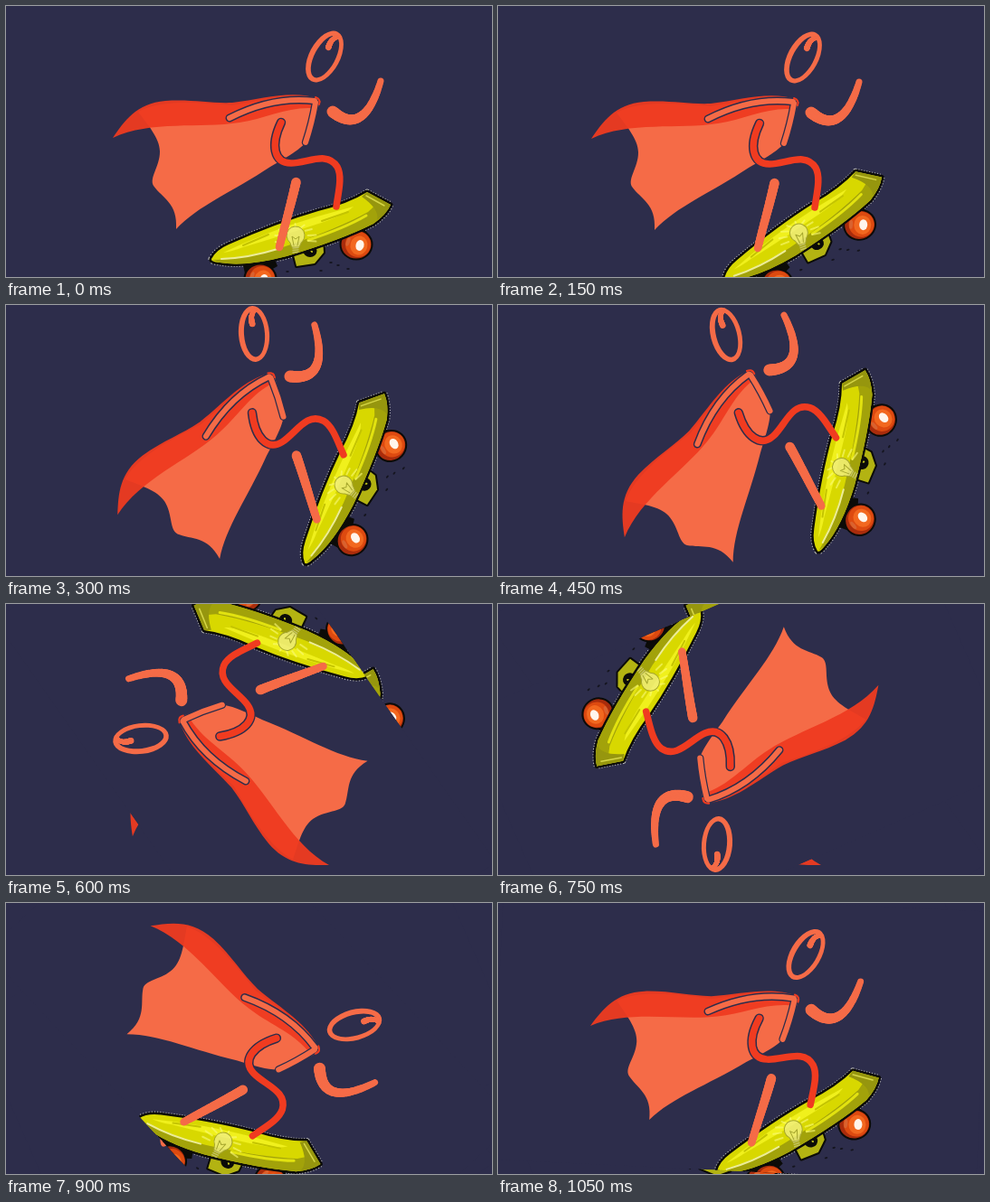
Animation, 537 px wide and 300 px high, one loop 1.2 s. Source, as an HTML page with a canvas:

```html
<!DOCTYPE html>
<html lang="en">
<head>
<meta charset="utf-8">
<title>Skateboard flip</title>
<style>
html, body { margin: 0; width: 100%; height: 100%; overflow: hidden; background: #2d2d4b; }
canvas { display: block; width: 100%; height: 100%; }
</style>
</head>
<body>
<canvas id="stage" width="537" height="300"></canvas>
<script>
const W = 537, H = 300, STEP = 150;
const NAVY = '#2d2d4b', ORANGE = '#f56b47', RED = '#f03b20', BLACK = '#0b0b08';
const ctx = document.getElementById('stage').getContext('2d');
const rad = deg => deg * Math.PI / 180;

// The head is the pivot: rotation in degrees, then head position.
// "card" poses paint a turned rectangle and leave the rest of the stage as it was.
const HEAD = { x: 352, y: 56 };
const poses = [
  { turn: 0, x: 352, y: 56, flat: true },
  { turn: 0, x: 337, y: 57 },
  { turn: -32, x: 274, y: 32 },
  { turn: -42.4, x: 252, y: 33 },
  { turn: -125, x: 149, y: 149, card: true },
  { turn: -203.6, x: 242, y: 266, card: true },
  { turn: -313, x: 385, y: 135, card: true },
  { turn: -357.3, x: 340, y: 57, card: true }
];

const shape = {
  cape: new Path2D('M146 117C156 131 170 146 170 161C170 178 158 190 163 199C173 213 190 218 188 247C212 221 250 206 292 178C318 163 333 154 336 142L347 106C322 98 285 103 250 110C210 106 170 104 146 117Z'),
  fold: new Path2D('M118 146C131 127 144 108 176 105C205 103 225 108 250 107C285 103 316 92 346 103Q349 105 346 109L337 113C310 112 285 125 258 129C215 136 160 126 118 146Z'),
  arm: new Path2D('M247 124C278 108 308 101 341 105'),
  torso: new Path2D('M342 107Q338 130 331 151'),
  backLeg: new Path2D('M304 129C292 154 296 174 315 174C333 174 355 160 366 178C372 189 367 207 365 222'),
  deck: new Path2D('M227 280Q232 270 246 264Q300 240 345 227Q378 219 399 206L425 220Q420 231 406 241Q370 259 310 277Q264 289 236 284Q226 283 227 280Z'),
  deckShade: new Path2D('M228 281Q262 281 306 267Q366 247 400 228L413 216L425 220Q420 231 406 241Q370 259 310 277Q264 289 236 284Z'),
  deckShine: new Path2D('M240 273Q290 249 344 233L384 222Q372 233 342 242Q300 256 262 267Q249 272 240 273Z'),
  nose: new Path2D('M399 206L425 220Q420 231 410 237Q413 225 393 211Z'),
  truck: new Path2D('M316 268L321 288L341 285L351 273L350 257Z')
};

function stroke(path, color, width) {
  ctx.strokeStyle = color;
  ctx.lineWidth = width;
  ctx.stroke(path);
}

function fill(path, color) {
  ctx.fillStyle = color;
  ctx.fill(path);
}

function oval(x, y, rx, ry, color, tilt = 0) {
  ctx.beginPath();
  ctx.ellipse(x, y, rx, ry, rad(tilt), 0, Math.PI * 2);
  ctx.fillStyle = color;
  ctx.fill();
}

function line(x1, y1, x2, y2, color, width) {
  stroke(new Path2D(`M${x1} ${y1}L${x2} ${y2}`), color, width);
}

// Cubic curve whose thickness runs from w0 to w1.
function taper(p, w0, w1) {
  const n = 60;
  for (let i = 0; i <= n; i++) {
    const t = i / n, u = 1 - t;
    const at = k => u * u * u * p[k] + 3 * u * u * t * p[k + 2] + 3 * u * t * t * p[k + 4] + t * t * t * p[k + 6];
    const r = (w0 + (w1 - w0) * t) / 2;
    oval(at(0), at(1), r, r, ORANGE);
  }
}

function wheel(x, y) {
  oval(x, y, 18.5, 17.5, BLACK);
  oval(x, y, 16.5, 15.5, '#a92c0c');
  oval(x + 2, y, 14, 14, '#dd4a10');
  oval(x + 3, y + 1, 9.5, 10.5, '#f2681f', 15);
  oval(x + 4, y + 1, 4.5, 6, '#fff6ec', 15);
  oval(x - 9, y - 3, 2, 5, '#d9622f', 20);
}

function bulb(x, y) {
  for (let i = 0; i < 9; i++) {
    const a = rad(165 + i * 26), c = Math.cos(a), s = Math.sin(a);
    line(x + c * 14, y + s * 13, x + c * 23, y + s * 16, 'rgba(250,250,120,.6)', 2);
  }
  ctx.beginPath();
  ctx.arc(x, y - 3, 10, rad(130), rad(50));
  ctx.lineTo(x + 4, y + 10);
  ctx.lineTo(x - 4, y + 10);
  ctx.closePath();
  ctx.fillStyle = 'rgba(240,238,130,.8)';
  ctx.fill();
  ctx.strokeStyle = '#a5a52c';
  ctx.lineWidth = 1;
  ctx.stroke();
  stroke(new Path2D(`M${x - 2} ${y + 8}L${x - 4} ${y - 2}L${x} ${y + 1}L${x + 4} ${y - 2}L${x + 2} ${y + 8}`), '#a5a52c', 1);
  for (let i = 0; i < 3; i++) line(x - 3, y + 11 + i * 2.4, x + 3, y + 10.5 + i * 2.4, '#c4c264', 1.4);
}

function board() {
  // Speckled rim
  ctx.setLineDash([1, 2]);
  ctx.lineCap = 'butt';
  stroke(shape.deck, 'rgba(235,235,225,.75)', 7);
  ctx.setLineDash([]);
  ctx.lineCap = 'round';

  fill(new Path2D('M262 287L296 278L300 288L286 296L264 296Z'), BLACK);
  fill(new Path2D('M366 258L396 246L402 258L388 262Z'), BLACK);
  wheel(281, 302);
  wheel(387, 264);

  stroke(shape.truck, BLACK, 4);
  fill(shape.truck, '#b3b312');
  oval(336, 271, 7.5, 7, BLACK);
  line(334, 267, 338, 272, '#c9c920', 2);
  for (const [x, y] of [[348, 293], [359, 284], [367, 287], [378, 291], [311, 294]]) oval(x, y, 1.8, 1, '#15151f');

  stroke(shape.deck, BLACK, 5);
  fill(shape.deck, '#d8d800');
  fill(shape.deckShade, '#a2a20a');
  fill(shape.deckShine, '#f0f01c');
  fill(shape.nose, '#96960e');
  line(398, 210, 418, 221, '#d6d646', 1.5);
  stroke(new Path2D('M238 280Q268 279 300 269'), '#ecec98', 2);
  stroke(new Path2D('M334 259Q374 246 398 232'), '#e2e210', 3);
  line(349, 238, 378, 228, '#c4c400', 2);
  line(262, 265, 290, 253, '#c4c400', 2);
  bulb(320, 257);
}

function head() {
  ctx.save();
  ctx.translate(HEAD.x, HEAD.y);
  ctx.rotate(rad(28));
  ctx.beginPath();
  ctx.ellipse(0, 0, 17, 31, 0, 0, Math.PI * 2);
  ctx.ellipse(0.5, 0, 11.5, 25.5, 0, 0, Math.PI * 2);
  ctx.fillStyle = ORANGE;
  ctx.fill('evenodd');
  taper([5, -27, 0, -25, -3, -20, -1, -11], 4, 6.5);
  ctx.restore();
}

function rider(flat) {
  fill(shape.cape, ORANGE);
  ctx.globalAlpha = 0.94;
  fill(shape.fold, RED);
  ctx.globalAlpha = 1;

  stroke(shape.arm, NAVY, 9);
  stroke(shape.torso, NAVY, 8.5);
  stroke(shape.arm, ORANGE, 6);
  stroke(shape.torso, ORANGE, 6);
  stroke(new Path2D('M342 101Q348 103 346 109'), RED, 2);
  stroke(shape.backLeg, NAVY, 10.5);

  ctx.save();
  if (!flat) {
    // The board tips up around its nose.
    ctx.translate(439, 188.5);
    ctx.rotate(rad(-16));
    ctx.translate(-425, -220);
  }
  board();
  ctx.restore();

  stroke(shape.backLeg, RED, 7.5);
  taper([320.5, 195, 315, 219, 308, 243, 302, 267], 10.5, 8.5);
  taper([361, 117, 384, 136, 402, 124, 414, 83], 13, 7);
  head();
}

function paint(pose) {
  ctx.save();
  if (!pose.card) {
    ctx.fillStyle = NAVY;
    ctx.fillRect(0, 0, W, H);
  }
  ctx.translate(pose.x, pose.y);
  ctx.rotate(rad(pose.turn));
  if (pose.card) {
    ctx.beginPath();
    ctx.rect(-337, -57, W, H);
    ctx.clip();
    ctx.fillStyle = NAVY;
    ctx.fillRect(-337, -57, W, H);
  }
  ctx.translate(-HEAD.x, -HEAD.y);
  ctx.lineCap = ctx.lineJoin = 'round';
  rider(pose.flat);
  ctx.restore();
}

let shown = -1;
function tick() {
  const step = Math.floor(performance.now() / STEP) % poses.length;
  if (step !== shown) {
    shown = step;
    // Rebuild from the last pose that covers the whole stage.
    let first = step;
    while (poses[first].card) first--;
    for (let i = first; i <= step; i++) paint(poses[i]);
  }
  requestAnimationFrame(tick);
}
tick();
</script>
</body>
</html>
```
